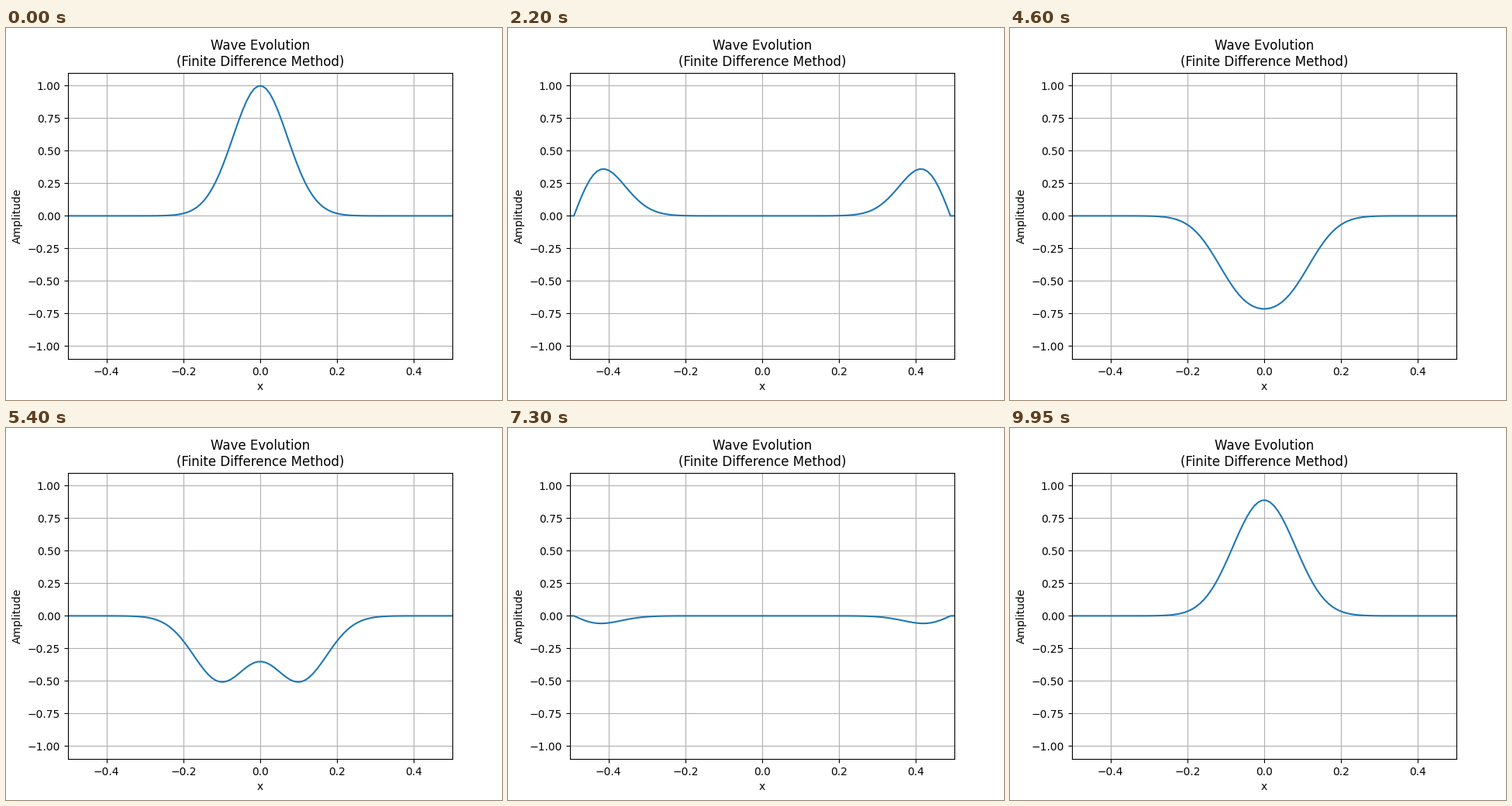
Recreate the animation shown at these times as a matplotlib script. Size 640x480 px, loop 10000 ms.

```python
import numpy as np
import matplotlib.pyplot as plt
from matplotlib.animation import FuncAnimation

FRAMES = 200
INTERVAL = 50  # ms
POINTS = 100
DT = 5 / 499

x = np.linspace(-0.5, 0.5, POINTS)
courant2 = (DT / (x[1] - x[0])) ** 2


def curvature(u):
    """Scaled second difference, zero on the two fixed points at each end."""
    d = np.zeros_like(u)
    d[2:-2] = courant2 * (u[3:-1] - 2 * u[2:-2] + u[1:-3])
    return d


def solve(steps):
    """Leapfrog solution of the wave equation, starting at rest."""
    u = np.zeros((steps, POINTS))
    u[0] = np.exp(-100 * x**2)
    u[1] = u[0] + curvature(u[0]) / 2
    for n in range(1, steps - 1):
        u[n + 1] = 2 * u[n] - u[n - 1] + curvature(u[n])
    return u


waves = solve(FRAMES)

fig, ax = plt.subplots(figsize=(6.4, 4.8), dpi=100)
line, = ax.plot(x, waves[0])
ax.set_xlim(-0.5, 0.5)
ax.set_ylim(-1.1, 1.1)
ax.set_xlabel("x")
ax.set_ylabel("Amplitude")
ax.set_title("Wave Evolution\n(Finite Difference Method)")
ax.grid(True)


def update(i):
    line.set_ydata(waves[i])
    return line,


anim = FuncAnimation(fig, update, frames=FRAMES, interval=INTERVAL, repeat=True)
plt.show()
```
